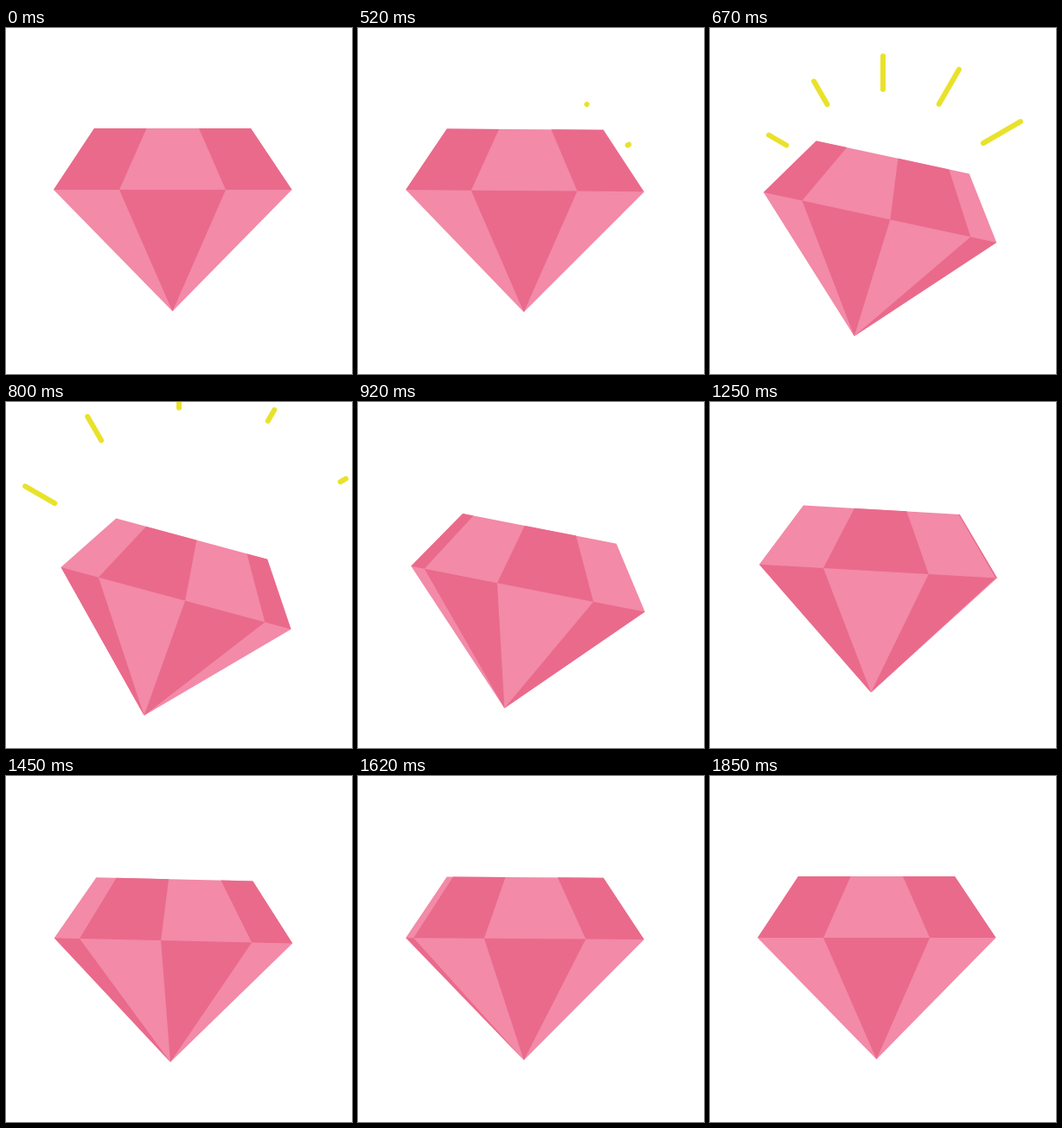
An HTML page with a canvas that plays this animation: 400x400 px, repeating every 1.87 s.

```html
<!DOCTYPE html>
<html lang="en">
<head>
<meta charset="utf-8">
<title>Spinning gem</title>
<style>
  html, body { margin: 0; width: 100%; height: 100%; overflow: hidden; background: #fff; }
  canvas { display: block; width: 400px; height: 400px; }
</style>
</head>
<body>
<canvas id="stage" width="400" height="400"></canvas>
<script>
const ctx = document.getElementById('stage').getContext('2d');
const LOOP = 1870, STEP = 25, START = 500, END = 1875;
const DARK = '#ea6a8b', LIGHT = '#f28aa8', YELLOW = '#e9e22b';

// Gem geometry: three facets across, meeting at the tip.
const CROWN = { y: 116, xs: [102, 162.5, 223, 283] };
const GIRDLE = { y: 187, xs: [55, 131, 254, 330.5] };
const TIP = [192.5, 327.5];
const PIVOT = [44.5, 221];
const TURNS = 6, PEAK = 750, TILT = 15.5;

const clamp = (v, lo, hi) => Math.min(hi, Math.max(lo, v));
const part = (t, from, to) => clamp((t - from) / (to - from), 0, 1);
const smooth = x => x * x * (3 - 2 * x);

// Cubic bezier easing with control points (a, 0) and (b, 1).
function bezier(a, b) {
  return x => {
    let lo = 0, hi = 1;
    for (let i = 0; i < 30; i++) {
      const s = (lo + hi) / 2, r = 1 - s;
      if (3 * s * r * r * a + 3 * s * s * r * b + s * s * s < x) lo = s;
      else hi = s;
    }
    return smooth((lo + hi) / 2);
  };
}
const spinEase = bezier(.33, .2);
const fallEase = bezier(.17, .15);

function pointOn(row, u) {
  const i = Math.min(2, Math.floor(u));
  return [row.xs[i] + (row.xs[i + 1] - row.xs[i]) * (u - i), row.y];
}

function fill(color, points) {
  ctx.fillStyle = color;
  ctx.beginPath();
  points.forEach(p => ctx.lineTo(...p));
  ctx.fill();
}

function drawGem(t) {
  const tilt = t < PEAK
    ? smooth(part(t, START, PEAK))
    : 1 - fallEase(part(t, PEAK, END));
  const shift = TURNS * (1 - spinEase(part(t, START, END))) % 2;

  ctx.save();
  ctx.translate(...PIVOT);
  ctx.rotate(TILT * tilt * Math.PI / 180);
  ctx.translate(-PIVOT[0], -PIVOT[1]);

  fill(LIGHT, [pointOn(CROWN, 0), pointOn(CROWN, 3), pointOn(GIRDLE, 3), TIP, pointOn(GIRDLE, 0)]);
  for (let i = -2; i < 3; i++) {
    const a = clamp(shift + i, 0, 3), b = clamp(shift + i + 1, 0, 3);
    if (b - a < .001) continue;
    const left = pointOn(GIRDLE, a), right = pointOn(GIRDLE, b);
    fill(DARK, i % 2 === 0
      ? [pointOn(CROWN, a), pointOn(CROWN, b), right, left]
      : [left, right, TIP]);
  }
  ctx.restore();
}

// Five rays, 30 degrees apart, fired one after another from right to left.
function drawRays(t) {
  const inner = 129, length = 94.5;
  ctx.strokeStyle = YELLOW;
  ctx.lineWidth = 6;
  ctx.lineCap = 'round';
  for (let i = 0; i < 5; i++) {
    const at = t - START - i * 18;
    const head = smooth(part(at, 0, 317));
    const tail = smooth(part(at, 150, 333));
    if (head - tail < .001) continue;
    const angle = (i + 1) * Math.PI / 6;
    const spot = p => {
      const r = inner + length * p;
      return [200 + r * Math.cos(angle), 200 - r * Math.sin(angle)];
    };
    ctx.beginPath();
    ctx.moveTo(...spot(tail));
    ctx.lineTo(...spot(head));
    ctx.stroke();
  }
}

function draw(ms) {
  const t = Math.floor((ms % LOOP + 5) / STEP) * STEP;
  ctx.fillStyle = '#fff';
  ctx.fillRect(0, 0, 400, 400);
  drawRays(t);
  drawGem(t);
}

const origin = performance.now();
function tick() {
  draw(performance.now() - origin);
  requestAnimationFrame(tick);
}
tick();
</script>
</body>
</html>
```
